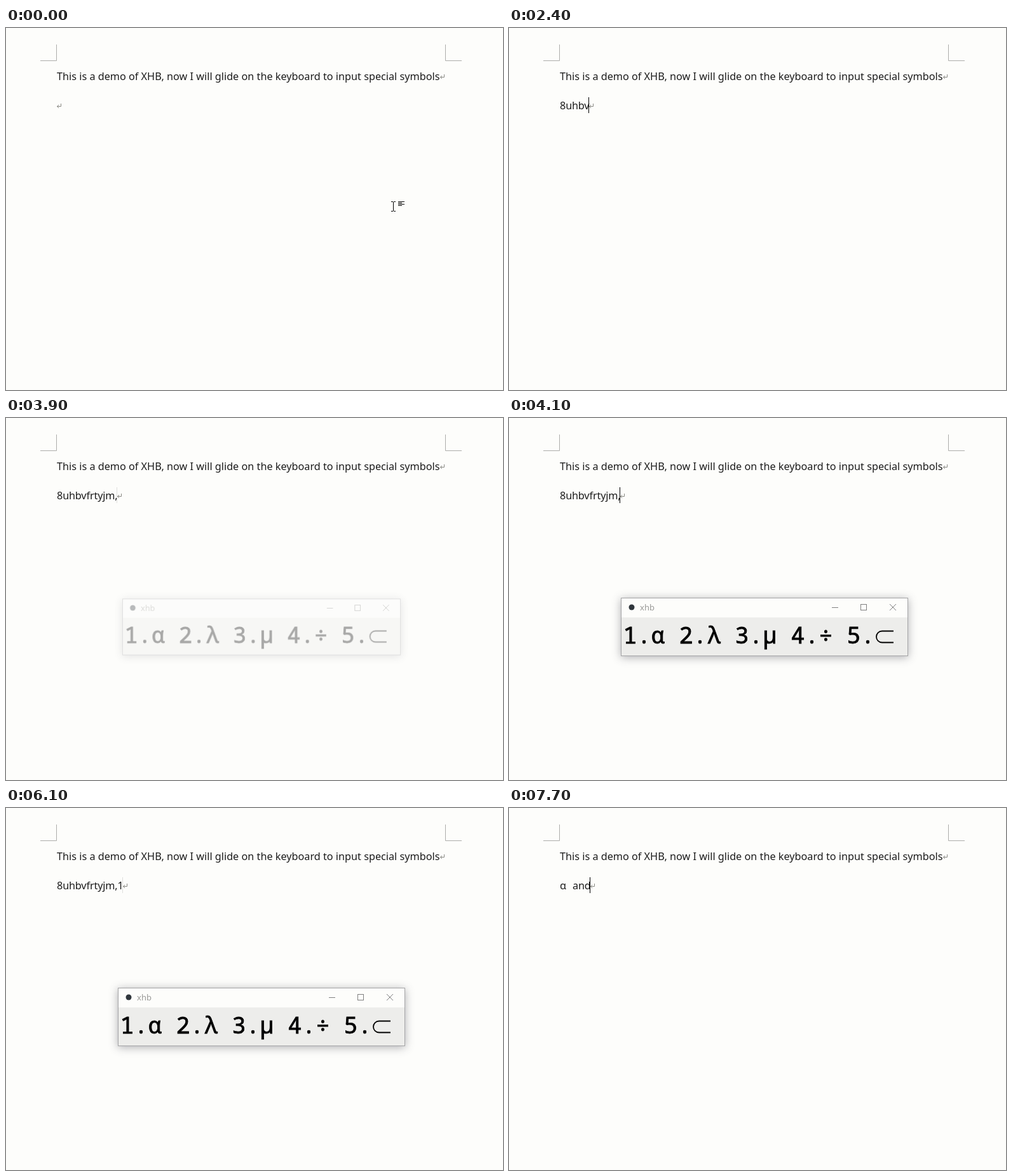
An HTML page with a canvas for the animation above (8000 ms loop, 782 by 570 pixels).

```html
<!DOCTYPE html>
<html lang="en">
<head>
<meta charset="utf-8">
<title>Typing special symbols</title>
<style>
  html, body { margin: 0; width: 100%; height: 100%; overflow: hidden; background: #fdfdfb; }
  canvas { display: block; }
</style>
</head>
<body>
<canvas id="stage" width="782" height="570"></canvas>
<script>
const W = 782, H = 570, LOOP = 8000, STEP = 100;
const PAPER = '#fdfdfb', INK = '#1c1c1c', LEFT = 80;
const BODY_FONT = '16.23px "Noto Sans", "Open Sans", sans-serif';
const TITLE_FONT = '13px "Noto Sans", "Open Sans", sans-serif';
const MONO_FONT = '36.67px "Noto Sans Mono", "DejaVu Sans Mono", monospace';
const GLIDE = '8uhbvfrtyjm,', BLINK = 1100;
const CENTER = { x: 402, y: 328.5 };

const ctx = document.getElementById('stage').getContext('2d');
const layer = document.createElement('canvas');
layer.width = W;
layer.height = H;
const win = layer.getContext('2d');

const clamp = (v, lo = 0, hi = 1) => Math.min(hi, Math.max(lo, v));

// The typed line: glide over the keys, pick 1, erase, insert the symbol, go on.
function typedAt(t) {
  if (t < 2100) return '';
  if (t < 2400) return GLIDE[0];
  if (t < 6100) return GLIDE.slice(0, 5 + Math.floor((t - 2400) / 500 * 7));
  if (t < 6400) return (GLIDE + '1').slice(0, 13 * (6400 - t) / 300);
  const spaces = clamp((t - 7000) / STEP, 0, 2);
  const letters = clamp((t - 7400) / STEP, 0, 3);
  return 'α' + ' '.repeat(spaces) + 'and'.slice(0, letters);
}

function lastEdit(t) {
  while (t > 0 && typedAt(t) === typedAt(t - STEP)) t -= STEP;
  return t > 0 ? t : -930;
}

// The blink restarts one step after each edit.
function caretAlpha(t) {
  const age = t - lastEdit(t - STEP) + 80;
  return clamp(0.35 + 2 * Math.sin(2 * Math.PI * age / BLINK));
}

function popupAlpha(t) {
  return t < 6400 ? clamp((t - 3800) / 300) : clamp(1 - (t - 6400) / 217);
}

function text(c, str, x, y, font, color) {
  c.font = font;
  c.fillStyle = color;
  c.fillText(str, x, y);
}

function line(c, ...points) {
  c.beginPath();
  for (let i = 0; i < points.length; i += 2) c.lineTo(points[i], points[i + 1]);
  c.stroke();
}

function returnMark(x, y) {
  ctx.strokeStyle = '#8a8a84';
  line(ctx, x + 6.5, y, x + 6.5, y + 4.5, x + 0.5, y + 4.5);
  line(ctx, x + 3, y + 2, x + 0.5, y + 4.5, x + 3, y + 7);
}

function drawPage() {
  ctx.fillStyle = PAPER;
  ctx.fillRect(0, 0, W, H);
  ctx.lineWidth = 1;
  ctx.strokeStyle = '#adadab';
  line(ctx, 79.5, 26, 79.5, 51.5, 54, 51.5);
  line(ctx, 691.5, 26, 691.5, 51.5, 717, 51.5);
  ctx.letterSpacing = '0px';
  text(ctx, 'This is a demo of XHB, now I will glide on the keyboard to input special symbols',
    LEFT, 82, BODY_FONT, INK);
  returnMark(683, 73);
}

function drawTyped(t) {
  const [, symbol, rest] = typedAt(t).match(/^(α?)(.*)$/);
  const x = symbol ? 91.8 : LEFT;
  ctx.letterSpacing = '-0.15px';
  text(ctx, symbol, LEFT, 128, BODY_FONT, INK);
  text(ctx, rest, x, 128, BODY_FONT, INK);
  const end = x + ctx.measureText(rest).width;
  returnMark(Math.floor(end + 0.3), 119);

  ctx.globalAlpha = caretAlpha(t);
  ctx.fillStyle = '#000';
  ctx.fillRect(Math.max(LEFT, Math.floor(end - 0.9)), 109, 1, 25);
  ctx.globalAlpha = 1;
}

function drawPointer() {
  ctx.fillStyle = '#000';
  ctx.fillRect(609, 274, 1, 14);
  for (const x of [606, 610]) {
    ctx.fillRect(x, 273, 3, 1);
    ctx.fillRect(x, 288, 3, 1);
  }
  for (let i = 0; i < 4; i++) ctx.fillRect(617, 273 + 2 * i, i % 2 ? 6 : 10, 1);
}

function paintButtons() {
  win.strokeStyle = '#808080';
  line(win, 508, 298.5, 518, 298.5);
  win.strokeRect(553.5, 293.5, 9, 9);
  line(win, 599, 293, 609, 303);
  line(win, 609, 293, 599, 303);
}

function paintSymbols() {
  const choices = '1.α 2.λ 3.μ 4.÷ 5.';
  text(win, choices, 179.5, 355, MONO_FONT, '#000');
  win.strokeStyle = '#000';
  win.lineWidth = 0.8;
  win.strokeText(choices, 179.5, 355);
  // Subset sign
  win.lineWidth = 1.8;
  win.beginPath();
  win.moveTo(605, 335.5);
  win.arc(587, 344.5, 9, -Math.PI / 2, Math.PI / 2, true);
  win.lineTo(605, 353.5);
  win.stroke();
}

function paintWindow(buttons) {
  win.clearRect(0, 0, W, H);
  win.save();
  win.shadowColor = 'rgba(80, 80, 90, 0.45)';
  win.shadowBlur = 13;
  win.shadowOffsetY = 2;
  win.fillStyle = PAPER;
  win.fillRect(176, 283, 452, 92);
  win.restore();

  win.fillStyle = '#ededeb';
  win.fillRect(177, 314, 450, 60);
  win.lineWidth = 1;
  win.strokeStyle = '#a4a4a6';
  win.strokeRect(176.5, 283.5, 451, 91);

  win.fillStyle = '#30363c';
  win.beginPath();
  win.arc(193, 298, 4.5, 0, Math.PI * 2);
  win.fill();
  text(win, 'xhb', 206, 303, TITLE_FONT, '#9a9a98');
  if (buttons) paintButtons();
  paintSymbols();
}

function drawPopup(t) {
  const alpha = popupAlpha(t);
  if (!alpha) return;
  paintWindow(t < 6500);
  const scale = 1 - 0.046 * (1 - alpha);
  ctx.save();
  ctx.globalAlpha = alpha;
  ctx.translate(CENTER.x, CENTER.y);
  ctx.scale(scale, scale);
  ctx.drawImage(layer, -CENTER.x, -CENTER.y);
  ctx.restore();
}

function render(elapsed) {
  const t = Math.floor((elapsed % LOOP) / STEP) * STEP;
  drawPage();
  drawTyped(t);
  if (t < 2100) drawPointer();
  drawPopup(t);
}

const origin = performance.now();
function tick() {
  render(performance.now() - origin);
  requestAnimationFrame(tick);
}
tick();
</script>
</body>
</html>
```
